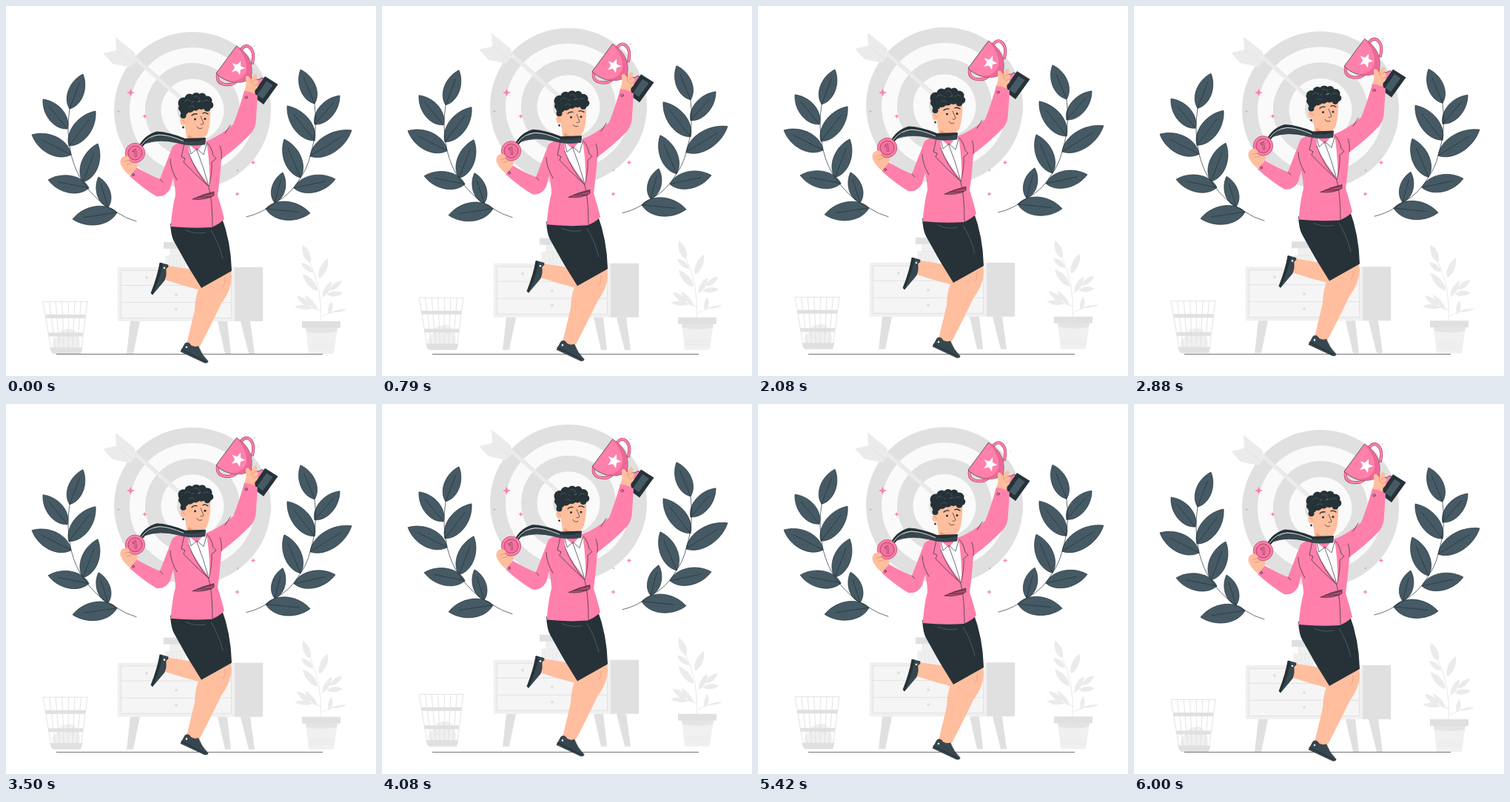
Animation, 500 px wide and 500 px high, one loop 6040 ms. Source, as an HTML page:

```html
<!DOCTYPE html>
<html lang="en">
<head>
<meta charset="utf-8">
<title>Winner</title>
<style>
html, body { margin: 0; width: 100%; height: 100%; overflow: hidden; background: #fff; }
svg { display: block; width: 100%; height: 100%; }
.line { fill: none; stroke: #263238; stroke-width: .7; stroke-linecap: round; stroke-linejoin: round; }
.pink { fill: #ff80ab; }
.skin { fill: #ffbe9d; }
.dark { fill: #263238; }
.slate { fill: #37474f; }
.edge { stroke: #263238; stroke-width: .7; stroke-linejoin: round; }
</style>
</head>
<body>
<svg viewBox="0 0 500 500">
  <g id="scene">
    <g id="target"></g>
    <path d="M174 70L240 128" stroke="#ebebeb" stroke-width="5.5"/>
    <path d="M177 70L241 126" stroke="#e0e0e0" stroke-width=".7"/>
    <path d="M148 42L174 63L176 74L168 83L144 78L131 64L149 60Z" fill="#ebebeb"/>
    <path d="M149 60L172 78" stroke="#e0e0e0" stroke-width=".7"/>

    <g fill="#e0e0e0">
      <path d="M168 426h13l-9 44h-9zM286 426h13l5 44h-8zM317 426h13l6 44h-8z"/>
      <path d="M309 353h38v73h-38z"/>
      <path d="M213 319h29v9h-29z"/>
    </g>
    <path d="M222 328h18v10h-18zM216 338h26v15h-26z" fill="#f0f0f0" stroke="#e6e6e6" stroke-width=".7"/>
    <path d="M221 340v12M226 340v12M231 340v12M236 340v12" stroke="#e6e6e6"/>
    <path d="M151 353h158v73H151z" fill="#f0f0f0"/>
    <path d="M155.5 357.5h149v64h-149zM155.5 377.5h149M155.5 400.5h149" fill="#f5f5f5" stroke="#e0e0e0" stroke-width=".9"/>
    <path d="M190 367h0M230 390h0M230 410h0" stroke="#e0e0e0" stroke-width="4" stroke-linecap="round"/>

    <path d="M63 463Q61 450 70 447Q72 436 82 437Q92 433 96 444Q102 452 99 463Z" fill="#f0f0f0"/>
    <path d="M70 447L78 456M82 437L88 449L96 444" stroke="#e4e4e4" fill="none"/>
    <g id="bin" fill="none" stroke="#e0e0e0" stroke-width=".9"></g>
    <path d="M53 417h54.500l-.7 5H53.700zM57 441.500h47l-.7 5H57.600z" fill="#e0e0e0"/>
    <path d="M59.500 461.500h44L101 470H64Q60 468 59.500 461.500Z" fill="#e0e0e0"/>

    <path d="M425 427Q428 380 410 345M427 394Q438 380 446 376M426 412Q412 408 400 402M427 420Q440 412 456 411" fill="none" stroke="#e4e4e4" stroke-width=".8"/>
    <g id="plant" fill="#ebebeb"></g>
    <path d="M405 434h43l-5 36h-34z" fill="#f0f0f0"/>
    <path d="M405 434h43l-1 6q-21 4-41 0z" fill="#e4e4e4"/>
    <path d="M409 457h35M409 460h35M410 463h33" stroke="#e6e6e6" stroke-width=".7"/>
    <path d="M400 426h52v9h-52z" fill="#e0e0e0"/>

    <g id="laurel"></g>
  </g>

  <path d="M68 470.500H428" stroke="#757575"/>

  <g id="hero">
    <!-- legs and shoes -->
    <path class="skin" d="M217 351Q242 354 258 358L272 374L263 384Q239 378 215 370Z"/>
    <path class="slate edge" d="M208 347L219 350Q220 353 216 355Q217 365 214 371L198 390L196 388Q205 365 208 347Z"/>
    <path class="dark" d="M208 347L212 348Q207 371 198 390L196 388Q205 365 208 347Z"/>
    <path class="skin" d="M264 376Q256 386 255 411L244 457Q253 464 262 460Q275 435 291 402Q305 383 305 366L303 354Z"/>
    <path class="line" d="M296 367Q297 375 293 379" style="stroke:#e89a76"/>
    <path class="slate edge" d="M242 456Q247 453 250 459Q255 462 260 460Q264 471 273 480Q273 483 268 482L236 467Z"/>
    <path class="line" d="M237 464L269 480" style="stroke-width:1.200"/>
    <path d="M214 354h0M244 461h0" stroke="#fff" stroke-width="2.600" stroke-linecap="round"/>

    <!-- skirt -->
    <path class="dark" d="M222 294Q223 311 227 318Q244 350 264 381L305 358Q304 318 291 284Z"/>
    <path d="M243 303Q256 309 270 306M277 303Q288 321 293 342" fill="none" stroke="#546e7a" stroke-width=".7"/>

    <!-- trophy -->
    <g fill="none" stroke="#263238" stroke-linecap="round">
      <g id="handles"><path d="M317 60Q322 52 328 55Q337 61 333 77M286 92Q284 104 296 106Q305 107 310 103"/></g>
    </g>
    <path class="pink edge" d="M329 95Q337 103 346 97L353 100L338 119L332 114Q334 107 326 101Z"/>
    <path class="pink edge" d="M311.500 54Q337 70 331 98Q319 106 302 102Q290 98 284 91Z"/>
    <path d="M311.500 54Q337 70 331 98Q319 106 302 102Q322 101 325 87Q327 72 311.500 54Z" fill="#ec6797"/>
    <path id="star" fill="#fff"/>
    <path class="dark" d="M350 95L367.500 106L348 133L332 121Z"/>
    <path d="M352 101L361 107L347 126L339 120Z" fill="#455a64" class="edge"/>
    <path class="skin" d="M321 117Q326 107 324 99Q323 93 328 95L331 99Q334 91 338 92Q341 95 338 99Q343 101 340 106Q342 110 336 113L337 122Z"/>
    <path class="line" d="M332 99Q331 104 334 106M338 99L334 102M340 106L335 108" style="stroke:#d98b68"/>

    <!-- neck -->
    <path class="skin" d="M242 160L266 166L269 186L258 199L245 187Z"/>

    <!-- jacket and shirt -->
    <path class="pink" d="M245 180Q231 185 225 190Q218 208 208 234Q193 228 176 218L167 230Q186 247 203 257Q215 259 222 247Q224 238 226 232Q229 247 229 256Q225 270 222.500 298Q253 301 278 299Q288 295 295 288Q292 275 286 256Q289 235 291 207Q314 190 332 171Q338 163 338 151L340 121Q331 115 322 115Q315 140 307 160Q290 175 270 183Z"/>
    <path d="M246 186L258 196L269 183L272 190Q276 220 275 243Q258 222 248 202Z" fill="#fff"/>
    <path class="line" d="M247 188L250 200L258 193L267 201L271 187M258 195Q267 218 273 240"/>
    <path class="line" d="M241 186L237 204L242 206L240 211Q255 227 274 244Q279 225 278 211L284 206L280 202Q278 191 272 185M247 199Q256 224 274 244"/>
    <path class="line" d="M222 207Q222 220 231 235M289 189Q292 195 291 207M274 245Q279 262 279 298M303 161L296 172M208 234L212 238"/>
    <path d="M252 261Q268 254 281 251L281 256Q269 263 252 261Z" fill="#b9476f" class="edge"/>
    <path class="line" d="M259 258L278 258M264 256L280 253"/>
    <g class="line"><circle cx="172" cy="228" r="1.500"/><circle cx="324.500" cy="123.500" r="1.700"/></g>

    <!-- head -->
    <path class="skin" d="M241 140Q240 164 245 173Q249 180 260 180Q270 180 273 170Q277 156 276 137Q257 127 241 140Z"/>
    <path d="M247 174Q253 181 265 178L264 181Q253 184 246 178Z" fill="#eb996e"/>
    <ellipse class="skin" cx="239.500" cy="156" rx="4.200" ry="5.500"/>
    <path class="line" d="M238 154Q241 154 241 158" style="stroke:#d98b68"/>
    <circle class="dark" cx="239.500" cy="164" r="1.400"/>
    <g id="hair" class="dark"></g>
    <path d="M241 130Q245 124 250 129M254 123Q259 120 262 126M266 130Q270 125 274 129M247 137Q251 133 255 137" fill="none" stroke="#546e7a" stroke-width=".6"/>
    <g class="dark"><circle cx="255.500" cy="153" r="1.500"/><circle cx="269" cy="152.500" r="1.500"/></g>
    <path class="line" d="M251 148Q254 145 258 146M266 145Q269 143 273 146" style="stroke-width:1.300"/>
    <path class="line" d="M263 149Q266 155 267 159Q265 161 263 160M258 163Q260 167 265 165"/>

    <!-- ribbon and medal -->
    <path class="dark" d="M179 190Q187 174 204 169.500Q220 170 242 179L270 178L269 185Q256 189 240 186Q222 174 205 174Q192 178 184 191Z"/>
    <path class="slate edge" d="M184 190Q190 179 205 175Q220 174 240 182Q256 184 269 180L269 187Q248 190 232 185Q207 179 188 186Z"/>
    <path d="M183 188Q192 175 207 174Q220 174 240 182.500" fill="none" stroke="#e0e0e0" stroke-width="1"/>
    <path class="skin" d="M167 229Q159 223 155 214Q153 207 158 204L172 200L178 215L176 220Z"/>
    <circle class="edge pink" cx="174.500" cy="198.500" r="13.200" style="stroke:#a83c63"/>
    <circle cx="174.500" cy="198.500" r="9.500" fill="#f2739f" stroke="#a83c63" stroke-width=".9"/>
    <text x="174.500" y="203.500" text-anchor="middle" font-family="Roboto, sans-serif" font-size="14" font-weight="700" fill="#ff80ab" stroke="#8e3254" stroke-width=".7" transform="rotate(-8 174 199)">1</text>
    <path class="skin" d="M156 205Q161 201 166 204Q169 207 165 209Q170 209 169 213Q175 211 175 215Q172 220 166 219L158 214Z"/>
    <path class="line" d="M165 209L160 210M169 213L163 214" style="stroke:#d98b68"/>
    <g id="glints" fill="#dcdcdc"></g>
  </g>
  <g id="sparks" class="pink"></g>
</svg>
<script>
const $ = id => document.getElementById(id);
const fill = (id, list, make) => $(id).innerHTML = list.map(make).join('');
const mix = (a, b, k) => a + (b - a) * k;

// Pointed leaf from its base to its tip, w wide at the middle
function leaf([bx, by, tx, ty, w]) {
  const d = Math.hypot(tx - bx, ty - by), h = w / 1.5;
  const nx = (by - ty) / d * h, ny = (tx - bx) / d * h;
  const at = (k, s) => `${mix(bx, tx, k) + s * nx} ${mix(by, ty, k) + s * ny}`;
  return `M${bx} ${by}C${at(.2, 1)} ${at(.7, 1)} ${tx} ${ty}C${at(.7, -1)} ${at(.2, -1)} ${bx} ${by}Z`;
}

function starPath(x, y, points, r, inner, turn) {
  return 'M' + Array.from({ length: points * 2 }, (_, i) => {
    const a = turn + i * Math.PI / points, q = i % 2 ? inner : r;
    return `${x + q * Math.cos(a)} ${y + q * Math.sin(a)}`;
  }).join('L') + 'Z';
}
const spark = ([x, y, r]) => `<path d="${starPath(x, y, 4, r, r * .38, 0)}"/>`;

fill('target', [106, 85, 64, 42.5, 21], (r, i) =>
  `<circle cx="252" cy="141" r="${r}" fill="${i % 2 ? '#fafafa' : '#e0e0e0'}"/>`);

fill('bin', [0, 1, 2, 3, 4, 5, 6, 7], i =>
  `<path d="M${50 + i * 8.57} 399.500L${61 + i * 5.8} 464"/>`);
$('bin').innerHTML += '<path d="M50 399.500h60"/>';

fill('plant', [
  [411, 347, 401, 323, 9], [423, 368, 435, 341, 9], [415, 360, 399, 347, 7],
  [421, 385, 401, 362, 9], [428, 393, 440, 372, 7], [438, 384, 454, 371, 7],
  [434, 390, 455, 388, 7], [411, 405, 393, 392, 7], [414, 408, 390, 406, 6],
  [421, 411, 404, 391, 6], [437, 417, 440, 399, 6], [440, 414, 460, 410, 3]
], p => `<path d="${leaf(p)}"/>`);

const leaves = [
  [86, 139, 104, 92, 21], [83, 166, 50, 126, 22], [85, 189, 121, 142, 24], [88, 201, 35, 174, 25],
  [104, 238, 124, 186, 23], [112, 246, 57, 235, 23], [138, 272, 125, 231, 18], [150, 279, 90, 288, 25],
  [417, 132, 398, 86, 21], [417, 160, 451, 121, 21], [417, 182, 380, 135, 24], [411, 203, 467, 168, 25],
  [398, 232, 376, 180, 23], [389, 246, 445, 234, 23], [363, 266, 374, 225, 18], [351, 274, 411, 280, 25]
];
fill('laurel', leaves, p => `<path d="${leaf(p)}" fill="#455a64" class="edge"/>` +
  `<path class="line" d="M${p[0]} ${p[1]}L${mix(p[0], p[2], .75)} ${mix(p[1], p[3], .75)}"/>`);
$('laurel').innerHTML += '<path class="line" d="M86 139Q81 170 88 201Q94 224 104 238Q122 265 150 279Q162 287 176 291' +
  'M417 132Q422 168 411 203Q407 219 398 232Q384 256 363 266Q346 280 325 285"/>';

fill('hair', [
  [240, 131, 7.500], [248, 125, 6.500], [257, 123.500, 6.500], [265, 123, 5.500], [272, 128, 6.500],
  [275.500, 134, 4.800], [272, 138, 4.500], [264, 134, 6], [256, 135, 6.500], [248, 137, 7],
  [241, 141, 6], [239.500, 148, 4], [237, 138, 4]
], ([x, y, r]) => `<circle cx="${x}" cy="${y}" r="${r}"/>`);

// Outlined tubes for the trophy handles
const tube = $('handles').innerHTML;
$('handles').innerHTML = `<g stroke-width="4" stroke="#a83c63">${tube}</g><g stroke-width="2.800" stroke="#ff80ab">${tube}</g>`;
$('star').setAttribute('d', starPath(313.5, 83.5, 5, 10, 4.3, -1.2));

fill('sparks', [[168.5, 117, 5.5], [187.5, 149, 3.3], [152, 142.5, 1.8], [334, 211.5, 3.3], [312.5, 254, 3.3], [313, 222, 1.8]], spark);
fill('glints', [[336, 54, 2], [341, 66, 1.5]], spark);

// Linear float: up 10 px and back once per period
const lift = (t, period) => -10 * (1 - Math.abs(1 - 2 * (t % period) / period));

function draw(now) {
  const t = now % 6040;
  $('scene').setAttribute('transform', `translate(0 ${lift(t, 3000)})`);
  $('hero').setAttribute('transform', `translate(0 ${lift(t, 6000)})`);
  requestAnimationFrame(draw);
}
draw(0);
</script>
</body>
</html>
```
